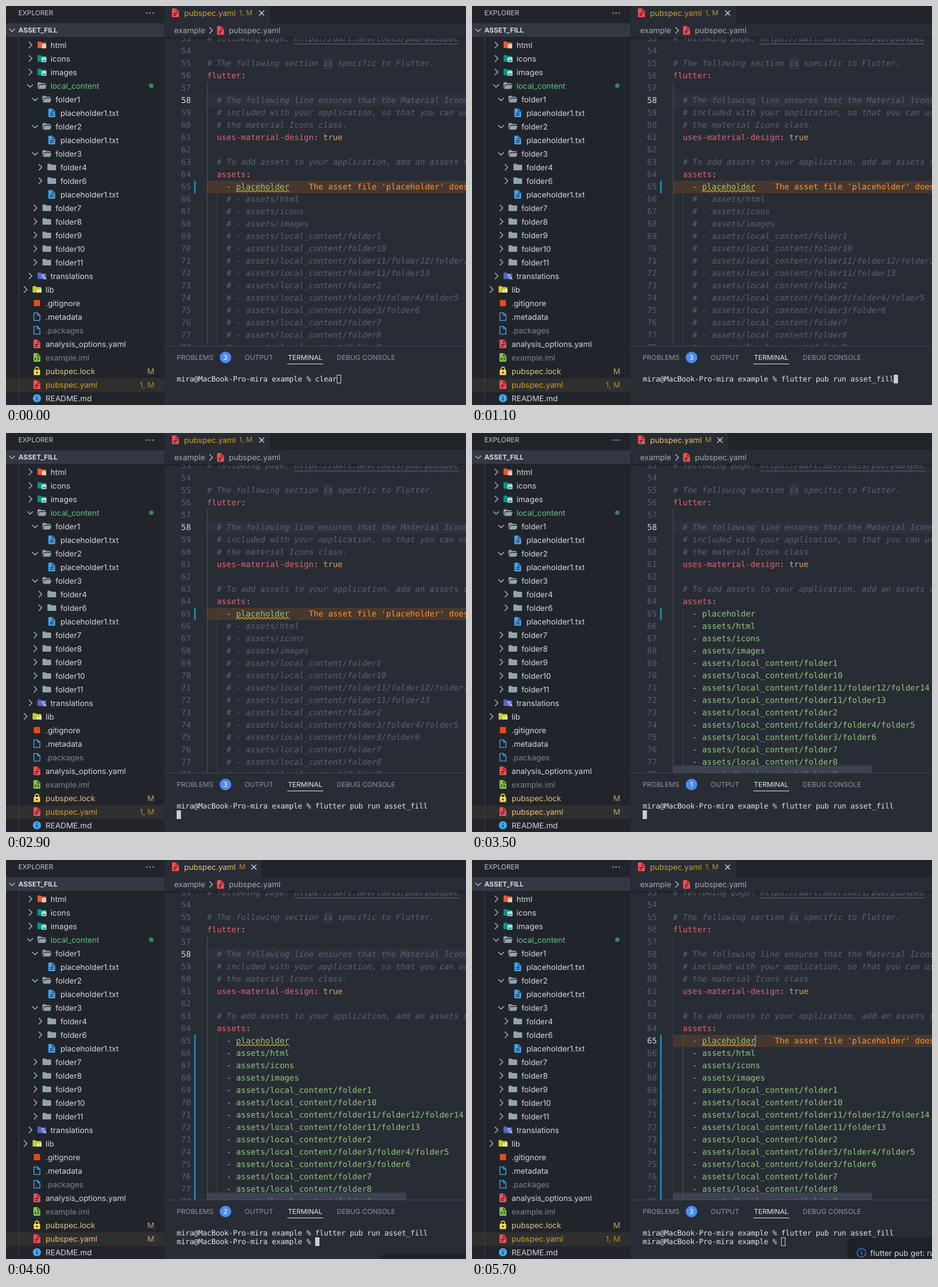
Recreate the animation shown at these times as an HTML page. Size 744 by 646 pixels, loop 5900 ms.

```html
<!DOCTYPE html>
<html lang="en">
<head>
<meta charset="utf-8">
<title>Editor and terminal</title>
<style>
html, body { margin: 0; width: 100%; height: 100%; overflow: hidden; background: #282c34; }
svg { display: block; width: 100vw; height: 100vh; }
text { white-space: pre; text-rendering: geometricPrecision; }
.ui { font: 12.6px Inter, "Open Sans", sans-serif; }
.cap { font: 11px Inter, "Open Sans", sans-serif; }
.code { font: 13px "DejaVu Sans Mono", monospace; }
.term { font: 12px "DejaVu Sans Mono", monospace; letter-spacing: -0.224px; }
.note { font-style: italic; }
</style>
</head>
<body>
<svg id="stage" viewBox="0 0 744 646"></svg>
<script>
const LOOP = 5900;
const CHAR = 7.826, LEFT = 325.3;
const C = {
  side: '#21252b', edit: '#282c34', text: '#d4d7dd', dim: '#7c828c', comment: '#5c6370',
  key: '#ea6170', str: '#90ca7e', plain: '#abb2bf', gold: '#c9a227', changed: '#e6c07b',
  green: '#66c08c', warn: '#ff942f', folder: '#90a4ae', num: '#596071', blue: '#42a5f5'
};

const rect = (x, y, w, h, fill, extra = '') =>
  `<rect x="${x}" y="${y}" width="${w}" height="${h}" fill="${fill}" ${extra}/>`;
const path = (d, stroke, width = 1, fill = 'none', extra = '') =>
  `<path d="${d}" stroke="${stroke}" stroke-width="${width}" fill="${fill}" ${extra}/>`;
const label = (x, y, s, fill, cls = 'ui', extra = '') =>
  `<text x="${x}" y="${y}" fill="${fill}" class="${cls}" ${extra}>${s}</text>`;
const group = (id, body, extra = '') => `<g id="${id}" ${extra}>${body}</g>`;
const at = (x, y, body) => `<g transform="translate(${x} ${y})">${body}</g>`;

const chevron = (x, y, open) => open
  ? path(`M${x - 4.5} ${y - 2}l4.5 4.5l4.5 -4.5`, '#c0c4cb', 1.1)
  : path(`M${x - 2} ${y - 5}l5 5l-5 5`, '#c0c4cb', 1.1);

// Icons are drawn around their own centre.
const shut = (c) => path('M-7 -4.6q0 -1 1 -1h4l1.5 1.5h6.5q1 0 1 1v7.2q0 1 -1 1h-12q-1 0 -1 -1z', 'none', 0, c);
const page = (c) => path('M-5.5 -5.7q0 -1.2 1.2 -1.2h5.3l4.5 4.5v8.1q0 1.2 -1.2 1.2h-8.6q-1.2 0 -1.2 -1.2z', 'none', 0, c)
  + path('M1 -6v4h4', C.side, 1.1);
const lines = path('M-3 1h6M-3 4h4', C.side, 1.4);
const icons = {
  folder: shut(C.folder),
  open: path('M-7 5v-9.5q0 -1 1 -1h4l1.5 1.5h5.5q1 0 1 1v.8h-9.5q-1 0 -1.3 1z', 'none', 0, C.folder)
    + path('M-4 -1.1h11.5l-2 6.4h-11.5z', 'none', 0, C.folder),
  html: shut('#e65a30') + rect(0, -1.5, 7, 7, '#ffc9b5'),
  pics: shut('#009688') + rect(-.5, -2, 8, 8, '#b2dfdb', 'rx="1"') + path('M.7 4.4l2 -2.6l1.3 1.4l1 -1.1l1.6 2.3z', 'none', 0, '#00897b'),
  lang: shut('#5365c4') + path('M-1 -1.5h5M1.5 -3v1.5M3.5 -1.5q-1 3 -4 4.5M0 -.5q1 2 3 3M3 6l2 -5l2 5M3.7 4.3h2.6', '#c9d0f5', 1),
  lib: shut('#c0ca33') + rect(0, 0, 3, 5, '#f0f4c3') + rect(4, -1.5, 3.4, 6.5, '#f0f4c3'),
  txt: page(C.blue) + path('M-3 .8h6M-3 3.8h6', C.side, 1.3),
  git: rect(-5, -5, 10, 10, '#e64a19'),
  file: path('M-4.8 -6.2h5.8l3.8 3.8v8.6h-9.6zM1 -6.2v3.8h3.8', C.blue, 1.3),
  yaml: page('#ff4f57') + lines,
  xml: page('#8bc34a') + path('M-1 .3l-2 2l2 2M1 .3l2 2l-2 2', C.side, 1.2),
  lock: rect(-5.2, -2, 10.4, 8.6, '#ffd54f', 'rx="1.2"') + path('M-2.8 -2v-1.7a2.8 2.8 0 0 1 5.6 0v1.7', '#ffd54f', 1.5)
    + `<circle cy="2.3" r="1.4" fill="${C.side}"/>`,
  info: `<circle r="6.6" fill="${C.blue}"/>` + path('M0 -.8v4.2M0 -3.5v1.5', C.side, 1.5)
};

// depth, icon, name, arrow (1 shut, 2 open), colour
const tree = [
  [1, 'html', 'html', 1], [1, 'pics', 'icons', 1], [1, 'pics', 'images', 1],
  [1, 'open', 'local_content', 2, C.green],
  [2, 'open', 'folder1', 2], [3, 'txt', 'placeholder1.txt'],
  [2, 'open', 'folder2', 2], [3, 'txt', 'placeholder1.txt'],
  [2, 'open', 'folder3', 2], [3, 'folder', 'folder4', 1], [3, 'folder', 'folder6', 1], [3, 'txt', 'placeholder1.txt'],
  ...[7, 8, 9, 10, 11].map(n => [2, 'folder', 'folder' + n, 1]),
  [1, 'lang', 'translations', 1], [0, 'lib', 'lib', 1],
  [0, 'git', '.gitignore'], [0, 'file', '.metadata'], [0, 'file', '.packages', 0, C.dim],
  [0, 'yaml', 'analysis_options.yaml'], [0, 'xml', 'example.iml', 0, C.dim],
  [0, 'lock', 'pubspec.lock', 0, C.changed], [0, 'yaml', 'pubspec.yaml', 0, C.gold], [0, 'info', 'README.md']
];

function sidebar() {
  let s = rect(0, 0, 256, 646, C.side) + rect(0, 603, 256, 22, '#302f2f')
    + path('M20.5 50V646', '#3a3f48');
  tree.forEach(([depth, icon, name, arrow, fill = C.text], i) => {
    const y = 63 + 22 * i, x = 8 * depth;
    if (arrow) s += chevron(39 + x - 8, y, arrow === 2);
    s += at(50 + x, y, icons[icon])
      + label(64 + x, y + 4.6, name, fill, 'ui', name === 'pubspec.yaml' ? 'id="treeName"' : '');
  });
  return s + `<circle cx="235" cy="129" r="3.6" fill="#3d8560"/>`
    + label(240, 595.5, 'M', '#bfa36d', 'ui', 'text-anchor="end"')
    + label(240, 617.5, '', '#a98b28', 'ui', 'text-anchor="end" id="treeMark"')
    + label(20, 15, 'EXPLORER', '#c3c7ce', 'cap')
    + [228, 233, 238].map(x => `<circle cx="${x}" cy="11.5" r="1.1" fill="#c3c7ce"/>`).join('')
    + rect(0, 28, 256, 22, '#333842') + chevron(10, 39, true)
    + label(20, 43, 'ASSET_FILL', C.text, 'cap', 'font-weight="700" style="font-weight:700"');
}

const lineY = n => 52 + 20 * (n - 53);
const code = (n, col, s, fill, cls = '', extra = '') =>
  label(LEFT + col * CHAR, lineY(n) + 4.8, s, fill, 'code ' + cls, extra);
const remark = (n, col, s, extra) => code(n, col, s, C.comment, 'note', extra);

const assets = ['html', 'icons', 'images',
  ...['1', '10', '11/folder12/folder14', '11/folder13', '2', '3/folder4/folder5', '3/folder6', '7', '8', '9']
    .map(p => 'local_content/folder' + p)].map(p => 'assets/' + p);

function squiggle() {
  let d = 'M372 301';
  for (let i = 0; i < 28; i++) d += `l3.07 ${i % 2 ? 2.6 : -2.6}`;
  return path(d, '#d6a520', 1.1);
}

function editor() {
  let s = rect(256, 50, 488, 500, C.edit)
    + rect(325, 143, 419, 20, '#2c313c', 'id="lineMark"')
    + rect(513, 83, 16, 20, '#2f343d')
    + group('warnRow', rect(325, 283, 419, 20, '#47382f'))
    + path('M325.5 123V550', '#4b5059', 1, 'none', 'id="guide0"')
    + path('M341.5 283V550', '#3b4048', 1, 'none', 'id="guide1"');
  for (let n = 53; n <= 78; n++)
    s += label(299, lineY(n) + 4.8, n, C.num, 'code', `text-anchor="end" id="n${n}"`);
  s += remark(53, 0, '# following page: ')
    + remark(53, 18, 'https://dart.dev/tools/pub/pubspec')
    + path('M466 61.5H732', C.comment)
    + remark(55, 0, '# The following section is specific to Flutter.')
    + code(56, 0, 'flutter', C.key) + code(56, 7, ':', C.plain)
    + remark(58, 2, '# The following line ensures that the Material Icons font is')
    + remark(59, 2, '# included with your application, so that you can use the icons in')
    + remark(60, 2, '# the material Icons class.')
    + code(61, 2, 'uses-material-design', C.key) + code(61, 22, ':', C.plain) + code(61, 24, 'true', '#dba366')
    + remark(63, 2, '# To add assets to your application, add an assets section, like this:')
    + code(64, 2, 'assets', C.key) + code(64, 8, ':', C.plain)
    + code(65, 4, '-', C.plain) + code(65, 6, 'placeholder', C.str)
    + group('warnText', code(65, 21, "The asset file 'placeholder' doesn't exist.", C.warn))
    + group('wave', squiggle())
    + group('before', assets.map((a, i) => remark(66 + i, 4, '# - ' + a)).join(''))
    + group('after', assets.map((a, i) => code(66 + i, 4, '-', C.plain) + code(66 + i, 6, a, C.str)).join('')
      + rect(325, 538.5, 322, 11.5, '#4e5666', 'opacity=".55"'))
    + rect(304, 283, 3, 20, '#1b81a8', 'id="gutter"')
    + rect(457.5, 283.5, 1.6, 19, '#528bff', 'id="caret"')
    + rect(256, 50, 488, 5, 'url(#shade)');
  return `<g clip-path="url(#view)">${s}</g>`;
}

function header() {
  return rect(256, 0, 488, 28, C.side) + rect(256, 0, 172, 28, C.edit, 'id="tab"')
    + rect(428, 0, 1, 28, '#181a1f', 'id="tabEdge"')
    + at(274, 11, icons.yaml) + label(288, 15.5, 'pubspec.yaml', C.gold, 'ui', 'id="tabName"')
    + label(377, 15, '', '#b3942c', 'ui', 'id="tabMark" style="font-size:11.6px"')
    + group('close', path('M-4 -4L4 4M4 -4L-4 4', '#d7dae0', 1.2))
    + rect(256, 28, 488, 22, C.edit)
    + label(272, 44.3, 'example', '#a4aab4') + chevron(331, 39.5, false)
    + at(347, 39.5, icons.yaml) + label(360.5, 44.3, 'pubspec.yaml', '#a4aab4');
}

function panel() {
  const grey = '#9097a3';
  return rect(256, 550, 488, 96, C.edit) + rect(256, 550, 488, 1, '#3e4452')
    + label(276, 573, 'PROBLEMS', grey, 'cap')
    + `<circle cx="355" cy="569" r="9.3" fill="#4d8bf5"/>`
    + label(355, 573, '', '#fff', 'cap', 'text-anchor="middle" id="badge"')
    + label(386, 573, 'OUTPUT', grey, 'cap')
    + label(456, 573, 'TERMINAL', '#e6e8ec', 'cap') + rect(455, 579, 58, 1, '#d7dae0')
    + label(535, 573, 'DEBUG CONSOLE', grey, 'cap')
    + label(276, 608, '', '#e2e4e8', 'term', 'id="row0"')
    + label(276, 622, '', '#e2e4e8', 'term', 'id="row1"')
    + rect(0, 0, 7, 14, '#c9ccd1', 'id="block"');
}

function toast() {
  return group('toast', rect(609, 0, 145, 50, '#1f2329', 'rx="2" filter="url(#soft)"')
    + `<circle cx="630" cy="23" r="7" fill="none" stroke="#3794ff" stroke-width="1.2"/>`
    + path('M630 21.5v5M630 18.5v1.6', '#3794ff', 1.4)
    + label(644, 27.6, 'flutter pub get: running...', C.text));
}

document.getElementById('stage').innerHTML = `<defs>
  <clipPath id="view"><rect x="256" y="50" width="488" height="500"/></clipPath>
  <linearGradient id="shade" x2="0" y2="1"><stop stop-color="#181a1f" stop-opacity=".7"/><stop offset="1" stop-color="#181a1f" stop-opacity="0"/></linearGradient>
  <filter id="soft" x="-20%" y="-40%" width="140%" height="180%"><feDropShadow dx="0" dy="0" stdDeviation="3" flood-color="#000" flood-opacity=".4"/></filter>
</defs>` + sidebar() + editor() + header() + panel() + toast();

const el = id => document.getElementById(id);
const set = (id, attrs) => { for (const k in attrs) el(id).setAttribute(k, attrs[k]); };
const show = (id, on) => set(id, { visibility: on ? 'visible' : 'hidden' });
const write = (id, s) => { if (el(id).textContent !== s) el(id).textContent = s; };

const prompt = 'mira@MacBook-Pro-mira example % ';
const command = 'flutter pub run asset_fill';

function problems(t) {
  const steps = [[4700, 3], [4500, 2], [3800, 3], [3700, 2], [3400, 1], [0, 3]];
  return steps.find(([from]) => t >= from)[1];
}

function terminal(t) {
  let typed = command;
  if (t < 100) typed = 'clear';
  else if (t < 1100) typed = command.slice(0, Math.round(command.length * Math.max(0, (t - 500) / 600)));
  const second = t >= 3900 ? prompt : '';
  const down = t >= 1700;
  const hollow = t < 100 || t >= 5500;
  const col = down ? second.length : prompt.length + typed.length;
  const inset = hollow ? 0.5 : 0;
  write('row0', prompt + typed);
  write('row1', second);
  set('block', {
    x: 276 + col * 7 + inset, y: (down ? 611 : 597) + inset,
    width: 7 - 2 * inset, height: 14 - 2 * inset,
    fill: hollow ? 'none' : '#c9ccd1', stroke: hollow ? '#c9ccd1' : 'none'
  });
}

function draw(now) {
  const t = Math.floor((now % LOOP) / 100) * 100;
  const count = problems(t), warned = count === 3;
  const filled = t >= 3400, clicked = t >= 5500;
  const name = warned ? C.gold : C.changed;

  write('badge', String(count));
  write('treeMark', warned ? '1, M' : 'M');
  write('tabMark', warned ? '1, M' : 'M');
  set('treeName', { fill: name });
  set('treeMark', { fill: warned ? '#a98b28' : '#bfa36d' });
  set('tabName', { fill: name });
  set('tab', { width: warned ? 172 : 158 });
  set('tabEdge', { x: warned ? 428 : 414 });
  set('close', { transform: `translate(${warned ? 413.5 : 401} 11.5)` });

  show('warnRow', warned);
  show('warnText', warned);
  show('wave', count > 1);
  show('before', !filled);
  show('after', filled);
  set('gutter', { height: t >= 3600 ? 267 : 20 });

  show('lineMark', !clicked);
  show('caret', t >= 5700);
  set('n58', { fill: clicked ? C.num : '#d7dae0' });
  set('n65', { fill: clicked ? '#d7dae0' : C.num });
  set('guide0', { stroke: clicked ? '#3b4048' : '#4b5059' });
  set('guide1', { stroke: clicked ? '#4b5059' : '#3b4048' });

  terminal(t);

  const k = Math.min(1, Math.max(0, (t - 4600) / 300));
  show('toast', t >= 4600);
  set('toast', { transform: `translate(0 ${613 + 26 * (1 - k) ** 2})` });
}

const start = performance.now();
function tick() {
  draw(performance.now() - start);
  requestAnimationFrame(tick);
}
tick();
</script>
</body>
</html>
```
